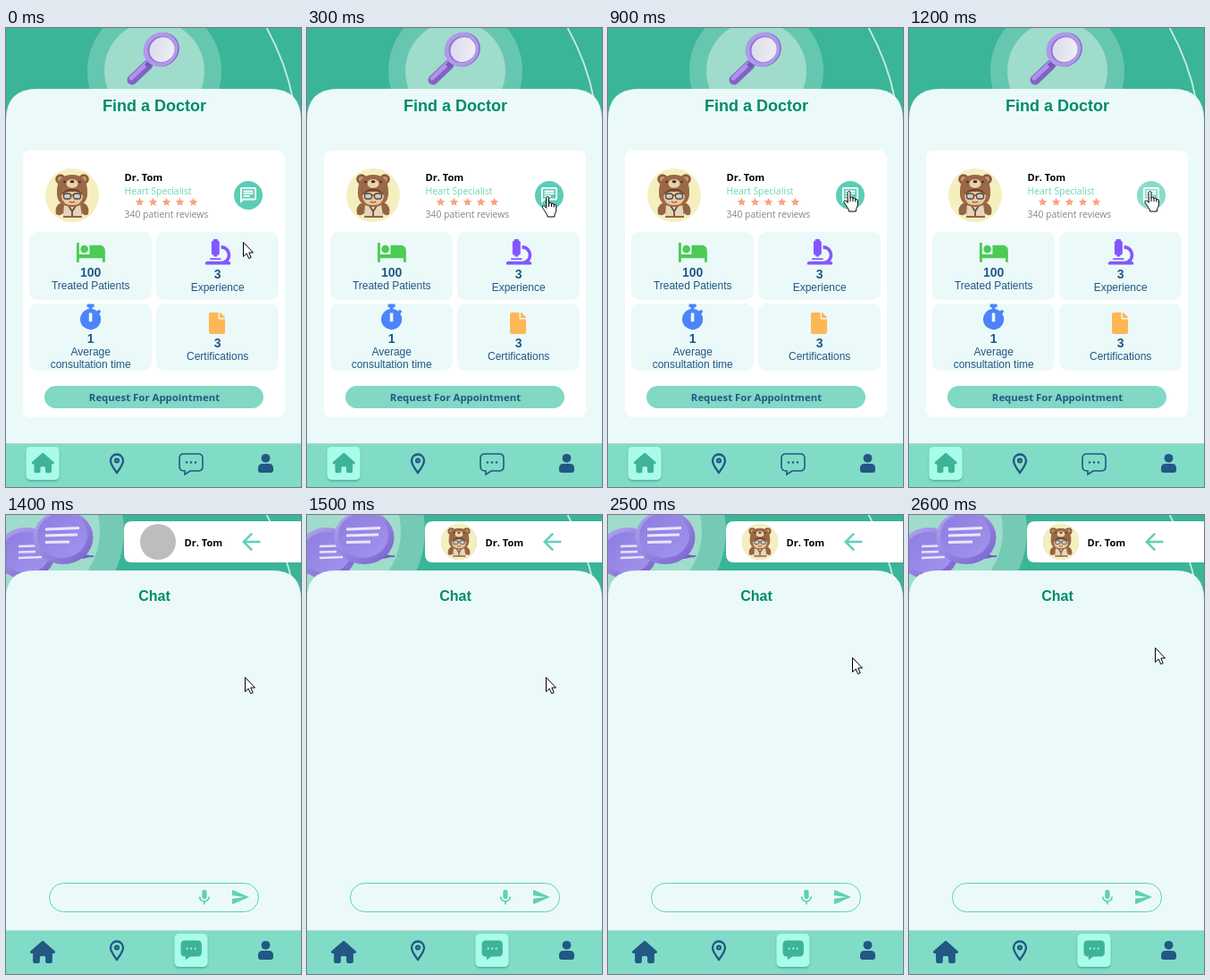
These frames come from a looping animation (330 by 513 pixels, 2.7 s). An HTML page:

```html
<!DOCTYPE html>
<html lang="en">
<head>
<meta charset="utf-8">
<title>Find a Doctor</title>
<style>
html, body { margin: 0; width: 100%; height: 100%; overflow: hidden; background: #ebfaf9; }
svg { display: block; width: 330px; height: 513px; }
text { font-family: "Liberation Sans", Arial, sans-serif; font-size: 12px; fill: #235784; }
.mid { text-anchor: middle; }
.bold { font-weight: 700; }
.num { font-size: 14px; font-weight: 700; }
.title { font-size: 18px; font-weight: 700; fill: #008b6c; }
.ui { font-family: "Open Sans", "Noto Sans", sans-serif; font-size: 10.4px; }
.name { font-size: 11.1px; font-weight: 700; fill: #000; }
</style>
</head>
<body>
<svg id="stage" viewBox="0 0 330 513">
  <defs>
    <linearGradient id="violet" x1="0" y1="0" x2="1" y2="1">
      <stop offset="0" stop-color="#b6a6f3"/><stop offset="1" stop-color="#7761cc"/>
    </linearGradient>
    <linearGradient id="face" x1="0" y1="0" x2="1" y2="1">
      <stop offset="0" stop-color="#8d7ce0"/><stop offset="1" stop-color="#a294ee"/>
    </linearGradient>
    <linearGradient id="glass" x1="0" y1="0" x2="1" y2="1">
      <stop offset="0" stop-color="#d9d8ea"/><stop offset="1" stop-color="#f1f2f6"/>
    </linearGradient>
    <filter id="soft" x="-20%" y="-20%" width="140%" height="150%">
      <feDropShadow dx="0" dy="1.5" stdDeviation="1.3" flood-color="#2c8570" flood-opacity=".55"/>
    </filter>
    <g id="bear">
      <circle r="30" fill="#f5efc0"/>
      <path d="M-14 9Q-20 13-18 21Q-14 24-10 20V25H11V20Q15 24 18 21Q20 13 14 9Z" fill="#966544"/>
      <path d="M-9 10H9L11 23H-10Z" fill="#e6d5b8"/>
      <path d="M-5 10L0 18 5 10M0 17V23" fill="none" stroke="#69503f" stroke-width="1.8"/>
      <circle cx="-13" cy="-18" r="5.8" fill="#8d5b3c"/><circle cx="13" cy="-18" r="5.8" fill="#8d5b3c"/>
      <circle cx="-13" cy="-18" r="3.1" fill="#c99a72"/><circle cx="13" cy="-18" r="3.1" fill="#c99a72"/>
      <path d="M-17-4Q-17-23 0-23Q17-23 17-4Q18 12 0 13Q-18 12-17-4Z" fill="#9a6846"/>
      <ellipse cy="-13" rx="6.5" ry="5" fill="#ead3ac"/>
      <ellipse cy="-15.3" rx="2.4" ry="1.6" fill="#4b3023"/>
      <circle cx="-8.5" cy="-15" r="1.3" fill="#4b3023"/><circle cx="8.5" cy="-15" r="1.3" fill="#4b3023"/>
      <path d="M-12 1Q-11-8 0-8Q11-8 12 1Q11 11 0 11Q-11 11-12 1Z" fill="#ecc69b"/>
      <path d="M-12 0Q-10-8 0-8Q10-8 12 0Q6-5 0-4Q-6-5-12 0Z" fill="#74482f"/>
      <g fill="#c7ced0" stroke="#53483c" stroke-width="1.3">
        <rect x="-9.5" y="-2" width="8" height="6" rx="2.5"/><rect x="1.5" y="-2" width="8" height="6" rx="2.5"/>
        <path d="M-1.5 0H1.5"/>
      </g>
      <path d="M-3 7Q0 9 3 7" fill="none" stroke="#84513a" stroke-width="1.2"/>
    </g>
    <path id="house" d="M576 255c0 18-15 32-32 32h-32v185c0 22-18 40-40 40h-80c-22 0-40-18-40-40v-88c0-18-14-32-32-32h-64c-18 0-32 14-32 32v88c0 22-18 40-40 40h-80c-22 0-40-18-40-40V287H32c-18 0-32-14-32-32 0-9 3-17 10-24L266 8c7-7 15-8 22-8s15 2 21 7l256 224c8 7 12 15 11 24z"/>
    <path id="balloon" d="M5 0H21Q26 0 26 5V14Q26 19 21 19H12L6 23V19H5Q0 19 0 14V5Q0 0 5 0Z"/>
    <path id="arc" d="M290-3Q313 38 321 80" fill="none" stroke="#c5eee3" stroke-width="1.8"/>
  </defs>

  <rect width="330" height="513" fill="#ebfaf9"/>
  <rect width="330" height="110" fill="#3ab598"/>

  <g id="home">
    <circle cx="166" cy="48" r="75" fill="#66c7b0"/>
    <circle cx="166" cy="48" r="56" fill="#9fdccb"/>
    <use href="#arc"/>
    <path d="M159 41L141 58" stroke="#8063c6" stroke-width="11" stroke-linecap="round"/>
    <path d="M157 40L140 56" stroke="#ae93e8" stroke-width="5" stroke-linecap="round"/>
    <path d="M163 37L157 43" stroke="#7558bc" stroke-width="6"/>
    <g transform="rotate(-40 173 24)">
      <ellipse cx="174" cy="25" rx="20" ry="18.5" fill="#8065c6"/>
      <ellipse cx="173" cy="24" rx="20" ry="18.5" fill="#b198eb"/>
      <ellipse cx="173.5" cy="24.5" rx="15.5" ry="14.5" fill="#8c70cf"/>
      <ellipse cx="174" cy="25.2" rx="14.5" ry="13.5" fill="url(#glass)"/>
    </g>
    <path d="M0 103Q0 68 35 68H295Q330 68 330 103V513H0Z" fill="#ebfaf9"/>
    <text class="mid title" x="166" y="93">Find a Doctor</text>
    <rect x="19" y="137" width="293" height="298" rx="8" fill="#fff"/>
    <use href="#bear" x="74" y="187"/>
    <text class="ui name" x="132.5" y="171">Dr. Tom</text>
    <text class="ui" x="132.5" y="186" style="fill:#68d4b9">Heart Specialist</text>
    <g id="stars" fill="#f9a47f"></g>
    <text class="ui" x="132.5" y="212" style="fill:#858585">340 patient reviews</text>
    <g id="chatBtn">
      <circle cx="271" cy="187" r="16" fill="#5ccdb5"/>
      <path transform="translate(260.2 176.2) scale(.9)" fill="#fff" d="M4 4h16v12H5.17L4 17.17V4m0-2c-1.1 0-1.99.9-1.99 2L2 22l4-4h14c1.1 0 2-.9 2-2V4c0-1.1-.9-2-2-2H4zm2 10h8v2H6v-2zm0-3h12v2H6V9zm0-3h12v2H6V6z"/>
    </g>
    <g id="tiles"></g>
    <path transform="translate(77.5 232.7) scale(1.45)" fill="#4ccb55" d="M7 13c1.66 0 3-1.34 3-3S8.66 7 7 7s-3 1.34-3 3 1.34 3 3 3zm12-6h-8v7H3V5H1v15h2v-3h18v3h2v-9c0-2.21-1.79-4-4-4z"/>
    <path transform="translate(222.8 236) scale(.0555)" fill="#8257ff" d="M160 320h12v16q0 16 16 16h40q16 0 16-16v-16h12q32 0 32-32V64q0-32-32-32V16q0-16-16-16h-64q-16 0-16 16v16q-32 0-32 32v224q0 32 32 32zM464 448h-1C493 414 512 369 512 320c0-106-86-192-192-192v64a128 128 0 0 1 0 256H48q-48 0-48 48 0 16 16 16h480q16 0 16-16 0-48-48-48zM104 416h208q8 0 8-8v-16q0-8-8-8H104q-8 0-8 8v16q0 8 8 8z"/>
    <path transform="translate(82.1 308.6) scale(.0557)" fill="#4d83fb" d="M432 304a208 208 0 1 1-240-205V64h-28q-12 0-12-12V12q0-12 12-12h120q12 0 12 12v40q0 12-12 12h-28v35c38 6 72 22 100 44l27-27q9-9 17 0l28 28q9 9 0 17l-30 30C420 223 432 262 432 304zM256 340V188q0-12-12-12h-40q-12 0-12 12v152q0 12 12 12h40q12 0 12-12z"/>
    <path transform="translate(227 318) scale(.047)" fill="#fdb755" d="M224 136V0H48Q0 0 0 48v416q0 48 48 48h288q48 0 48-48V160H248q-24 0-24-24zM384 122v6H256V0h6q10 0 17 7l98 98q7 7 7 17z"/>
    <rect x="43" y="400" width="245" height="25" rx="12.5" fill="#80d8c5"/>
    <text class="ui mid bold" x="166" y="417" style="font-size:11.4px">Request For Appointment</text>
  </g>

  <g id="chat">
    <circle cx="26" cy="18" r="106" fill="#74cab5"/>
    <circle cx="26" cy="18" r="79" fill="#9fdccb"/>
    <use href="#arc"/>
    <path d="M-2 67L-4 55 8 62Z" fill="#7964cc"/>
    <ellipse cx="22" cy="43" rx="33" ry="29" fill="url(#violet)"/>
    <ellipse cx="22" cy="42" rx="27" ry="23" fill="url(#face)"/>
    <path d="M14 35L34 34.500M14 41.500L33 41M14 48L40 47" stroke="#e6e2fa" stroke-width="2.600"/>
    <path d="M83 42Q91 46 98 45Q99 48 94 47Q84 50 75 49Z" fill="#735dc6"/>
    <ellipse cx="64" cy="25" rx="33.500" ry="30" fill="url(#violet)"/>
    <ellipse cx="63" cy="23" rx="28" ry="25" fill="url(#face)"/>
    <path d="M44 16L82 14.500M44 23L80 22M44 30.500L71 30" stroke="#e9e6fc" stroke-width="2.800"/>
    <path d="M141 7H330V53H141Q132 53 132 44V16Q132 7 141 7Z" fill="#fff"/>
    <circle cx="170" cy="30" r="20" fill="#bdbdbd"/>
    <use id="avatar" href="#bear" transform="translate(170 30) scale(.667)"/>
    <text class="ui name" x="199.500" y="35">Dr. Tom</text>
    <path transform="translate(258.900 14.600) scale(1.280)" fill="#62d0b7" d="M20 11H7.830l5.590-5.590L12 4l-8 8 8 8 1.410-1.410L7.830 13H20v-2z"/>
    <path d="M0 94Q0 62 32 62H298Q330 62 330 94V513H0Z" fill="#ebfaf9"/>
    <text class="mid title" x="166" y="96" style="font-size:16px">Chat</text>
    <rect x="48.500" y="411.500" width="234" height="32" rx="16" fill="none" stroke="#5ed0b6"/>
    <g fill="#5ed0b6">
      <path transform="translate(211.500 417) scale(.870)" d="M12 14q3 0 3-3V5q0-3-3-3T9 5v6q0 3 3 3zM17 11a5 5 0 0 1-10 0H5c0 3.530 2.610 6.430 6 6.920V21h2v-3.080c3.390-.490 6-3.390 6-6.920z"/>
      <path transform="translate(251.200 416.200) scale(.900)" d="M2 21L23 12 2 3V10l15 2-15 2z"/>
    </g>
  </g>

  <rect y="464" width="330" height="49" fill="#80dcc7"/>
  <rect y="464" width="330" height="1" fill="#b3d8ce"/>
  <rect id="tab" y="468" width="37" height="37" rx="5" fill="#a9fbea" filter="url(#soft)"/>
  <use id="homeIcon" href="#house"/>
  <g fill="none" stroke="#235784" stroke-width="2.300">
    <path d="M124 497Q117 488 117 483.500A7 7 0 0 1 131 483.500Q131 488 124 497Z"/>
    <circle cx="124" cy="483.500" r="1.900"/>
  </g>
  <g id="chatIcon">
    <use id="bubble" href="#balloon"/>
    <g id="dots"></g>
  </g>
  <g fill="#235784">
    <circle cx="290.500" cy="480.800" r="4.900"/>
    <path d="M287 487H294Q299 487 299 492V494Q299 497 296 497H285Q282 497 282 494V492Q282 487 287 487Z"/>
  </g>

  <path id="arrow" fill="#fff" stroke="#000" d="M.500.500V16.500L4.200 13 6.700 18.600 9.200 17.500 6.800 12H11.500Z"/>
  <g id="hand" stroke="#000" stroke-linecap="round" stroke-linejoin="round">
    <path fill="#fff" d="M5.500 2c0-2 3-2 3 0V8c.200-1.400 2.800-1.300 3 .200v.600c.300-1.200 2.600-1 2.800.400v.800c.400-1 2.400-.800 2.500.800v5c0 2-1.800 3-2 7.200H7.200C6.800 20 4 17 2.500 14.300 0 11.500 2 9.800 4.200 11.600L5.500 13Z"/>
    <path fill="none" d="M8.500 8V11.500M11.500 8.500V11.500M14.300 9.500V12"/>
  </g>
</svg>
<script>
const LOOP = 2700, STEP = 100;
const OPEN_CHAT = 1400, AVATAR_LOADED = 1500;
const NAVY = "#235784", GREEN = "#3fb397";
const $ = id => document.getElementById(id);
const set = (id, attrs) => {
  for (const key in attrs) $(id).setAttribute(key, attrs[key]);
};
const show = (id, on) => set(id, { display: on ? "inline" : "none" });

const star = (cx, cy, r) => {
  const points = Array.from({ length: 10 }, (_, i) => {
    const a = i * Math.PI / 5 - Math.PI / 2, d = i % 2 ? r * .48 : r;
    return (cx + d * Math.cos(a)).toFixed(2) + "," + (cy + d * Math.sin(a)).toFixed(2);
  });
  return `<polygon points="${points.join(" ")}"/>`;
};
$("stars").innerHTML = [0, 1, 2, 3, 4].map(i => star(149.5 + 15 * i, 194.7, 5)).join("");

// Each tile: left, top, height, first baseline, value, label lines
const tiles = [
  [26, 228, 76, 278, "100", "Treated Patients"],
  [168, 228, 76, 280, "3", "Experience"],
  [26, 308, 75, 352, "1", "Average", "consultation time"],
  [168, 308, 75, 357, "3", "Certifications"]
];
$("tiles").innerHTML = tiles.map(([x, y, h, base, ...lines]) =>
  `<rect x="${x}" y="${y}" width="137" height="${h}" rx="9" fill="#ebfaf9"/>` +
  lines.map((line, i) =>
    `<text class="mid ${i ? "" : "num"}" x="${x + 68.7}" y="${base + 14 * i}">${line}</text>`).join("")
).join("");

$("dots").innerHTML = [8, 13, 18].map(x => `<circle cx="${x}" cy="9.5" r="1.2"/>`).join("");

// Pointer stops: time, x, y, over a button
const stops = [
  [0, 265, 239, 0], [100, 267, 224, 0], [200, 269, 206, 0],
  [300, 262, 188, 1], [400, 260, 183, 1], [600, 261, 183, 1],
  [700, 262, 183, 1], [900, 262.5, 182, 1], [1400, 267, 181, 0],
  [2300, 269, 177, 0], [2400, 271, 169, 0], [2500, 273, 159, 0], [2600, 275, 148, 0]
];

function drawNav(chatting) {
  set("tab", { x: chatting ? 188.5 : 22.5 });
  set("homeIcon", {
    transform: chatting ? "translate(27 476) scale(.0486)" : "translate(28.7 475) scale(.0435)",
    fill: chatting ? NAVY : GREEN
  });
  set("chatIcon", { transform: chatting ? "translate(195.5 475.5) scale(.9 .95)" : "translate(194 476)" });
  set("bubble", {
    fill: chatting ? GREEN : "none",
    stroke: chatting ? "none" : NAVY,
    "stroke-width": 1.6
  });
  set("dots", { fill: chatting ? "#a9fbea" : NAVY });
}

function draw(ms) {
  const t = Math.floor(ms % LOOP / STEP) * STEP;
  const chatting = t >= OPEN_CHAT;
  show("home", !chatting);
  show("chat", chatting);
  show("avatar", t >= AVATAR_LOADED);
  set("chatBtn", { opacity: t < 1100 ? 1 : t < 1200 ? .85 : .7 });
  drawNav(chatting);

  const [, x, y, over] = stops.filter(stop => stop[0] <= t).pop();
  show("hand", over);
  show("arrow", !over);
  set(over ? "hand" : "arrow", { transform: `translate(${x} ${y})` });
}

const start = performance.now();
function tick() {
  draw(performance.now() - start);
  requestAnimationFrame(tick);
}
tick();
</script>
</body>
</html>
```
